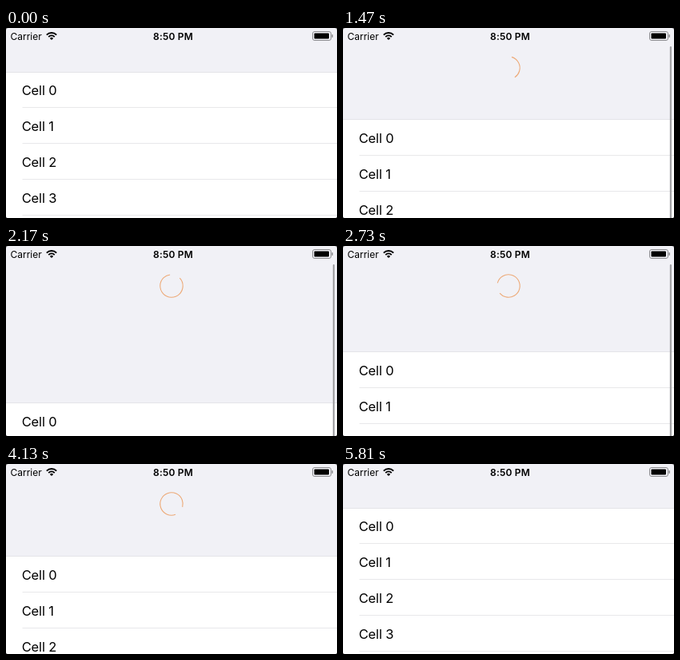
These frames come from a looping animation (414 px wide and 238 px high, 6230 ms). An HTML page with a canvas:

```html
<!DOCTYPE html>
<html lang="en">
<head>
<meta charset="utf-8">
<title>Pull to refresh</title>
<style>
  html, body { margin: 0; width: 100%; height: 100%; overflow: hidden; background: #f1f1f6; }
  canvas { display: block; width: 414px; height: 238px; }
</style>
</head>
<body>
<canvas id="stage" width="414" height="238"></canvas>
<script>
const W = 414, H = 238, LOOP = 6230;
const ctx = document.getElementById('stage').getContext('2d');
const FONT = 'Inter, Roboto, sans-serif';
const RAD = Math.PI / 180;

const TOP = 55, ROW = 45, REST = 60.5, PEAK = 148.3;
const PRESS = 1050, DRAG = 1190, DRAG_TIME = 1240, SPIN = 2170;
const RELEASE = 2450, FINISH = 4940, DONE = 5600;

const clamp = (v, lo = 0, hi = 1) => Math.min(hi, Math.max(lo, v));
const ramp = (t, from, to) => clamp((t - from) / (to - from));

// Critically damped return, 1 -> 0
function settle(ms) {
  const x = ms * 0.0108;
  return (1 + x) * Math.exp(-x);
}

function pullAt(t) {
  if (t < DRAG || t >= DONE) return 0;
  if (t < RELEASE) return PEAK * (1 - (1 - ramp(t, DRAG, DRAG + DRAG_TIME)) ** 2);
  if (t < FINISH) return REST + (PEAK - REST) * settle(t - RELEASE);
  return REST * settle(t - FINISH);
}

function box(x, y, w, h, color) {
  ctx.fillStyle = color;
  ctx.fillRect(x, y, w, h);
}

function pill(x, y, w, h, r, color) {
  ctx.fillStyle = color;
  ctx.beginPath();
  ctx.roundRect(x, y, w, h, r);
  ctx.fill();
}

function label(str, x, y, size, weight = 400, align = 'left', spacing = 0) {
  ctx.font = `${weight} ${size}px ${FONT}`;
  ctx.letterSpacing = spacing + 'px';
  ctx.textAlign = align;
  ctx.fillStyle = '#000';
  ctx.fillText(str, x, y);
}

function drawWifi(x, y) {
  ctx.strokeStyle = ctx.fillStyle = '#000';
  ctx.lineWidth = 2;
  for (const r of [5.4, 8.9]) {
    ctx.beginPath();
    ctx.arc(x, y, r, -134 * RAD, -46 * RAD);
    ctx.stroke();
  }
  ctx.beginPath();
  ctx.moveTo(x, y);
  ctx.arc(x, y, 3, -135 * RAD, -45 * RAD);
  ctx.fill();
}

function drawBattery() {
  ctx.strokeStyle = '#8c8c90';
  ctx.lineWidth = 1;
  ctx.beginPath();
  ctx.roundRect(383.5, 4.5, 23, 11, 2.5);
  ctx.stroke();
  pill(385.5, 6.5, 18.5, 7, 1, '#000');
  pill(407.5, 8, 1.5, 4, 0.7, '#8c8c90');
}

function drawStatus() {
  label('Carrier', 5.5, 14.7, 12);
  drawWifi(57, 15);
  label('8:50 PM', 209, 14.7, 12, 600, 'center', 0.2);
  drawBattery();
}

function drawSpinner(t, pull) {
  if (t < DRAG || t >= DONE) return;
  const p = t < SPIN ? pull : pullAt(SPIN);
  const sweep = Math.min(2.18 * p, 306);
  const turn = Math.max(0, t - SPIN) * 0.425;
  const start = -95 + 0.36 * p + turn;
  ctx.globalAlpha = 1 - ramp(t, FINISH, FINISH + 350);
  ctx.strokeStyle = '#edaa78';
  ctx.lineWidth = 1.1;
  ctx.beginPath();
  ctx.arc(207, 50, 14.2, start * RAD, (start + sweep) * RAD);
  ctx.stroke();
  ctx.globalAlpha = 1;
}

function drawTable(t, pull) {
  const edge = Math.floor(TOP + pull);
  const top = Math.round(TOP + pull);
  box(0, edge, W, H, '#fff');
  box(0, edge, W, 1, '#e4e4e8');
  for (let i = 0; top + i * ROW < H; i++) {
    const y = top + i * ROW;
    if (i === 0 && t >= PRESS && t < DRAG) box(0, y, W, ROW, '#dadada');
    else box(20.5, y + ROW - 1, W, 1, '#e8e8ea');
    label('Cell ' + i, 19.7, y + 28.6, 16.5, 400, 'left', -0.15);
  }
}

function drawScrollbar(t) {
  const alpha = ramp(t, DRAG, DRAG + 140) * (1 - ramp(t, 3250, 3550));
  if (!alpha) return;
  ctx.globalAlpha = alpha;
  pill(408.8, 23, 2.2, H, 1.1, '#a2a2a5');
  ctx.globalAlpha = 1;
}

function draw(t) {
  const pull = pullAt(t);
  box(0, 0, W, H, '#59595b');
  ctx.save();
  ctx.beginPath();
  ctx.roundRect(0, 0, W, H, 3);
  ctx.clip();
  box(0, 0, W, H, '#f1f1f6');
  drawSpinner(t, pull);
  drawTable(t, pull);
  drawScrollbar(t);
  drawStatus();
  ctx.restore();
}

const begin = performance.now();
function tick() {
  draw((performance.now() - begin) % LOOP);
  requestAnimationFrame(tick);
}
tick();
</script>
</body>
</html>
```
